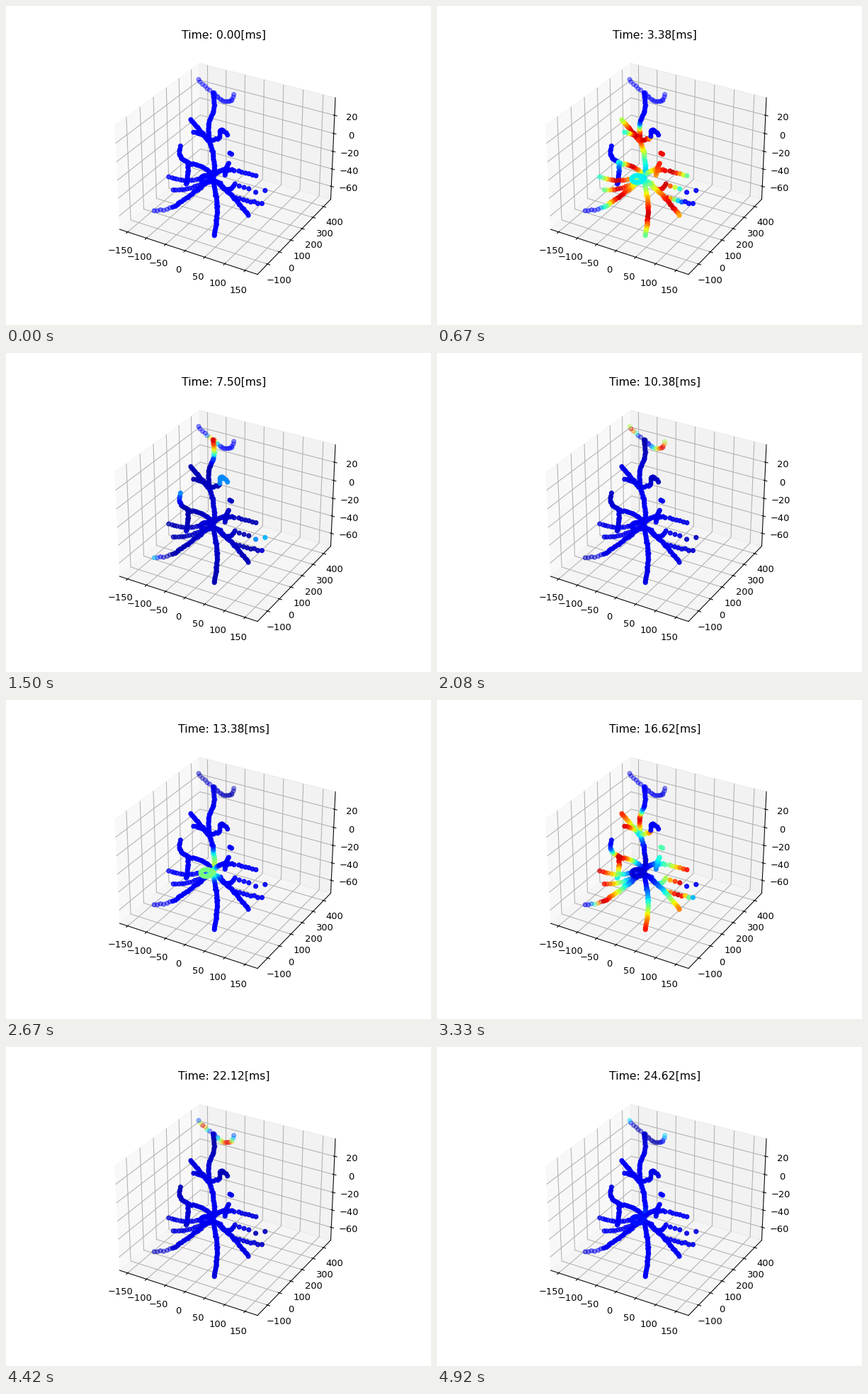
Write a matplotlib script that moves like this. It is 600 by 450 pixels and loops after 5.01 s.

```python
import matplotlib.pyplot as plt
import numpy as np
from matplotlib.animation import FuncAnimation

W, H = 600, 450
TICK_MS, TICKS = 30, 167             # one loop lasts 5010 ms
FPS, STEPS = 12, 60
REST, PEAK = 0.11, 0.93              # membrane levels on the colour map
FIRST_SPIKE, PERIOD = 1.95, 12.3     # simulated ms
SOMA = 291, 243

rng = np.random.default_rng(4)
parts = []


def add(x, y, delay, alpha):
    parts.append(np.broadcast_arrays(x, y, delay, alpha))


def grow(points, start, end, power=1, gap=2.5, alpha=0.9):
    """Dots on a smooth curve through points; the wave passes from start to end."""
    pts = np.array(points, float)
    chord = np.hypot(*np.diff(pts, axis=0).T)
    at = np.concatenate([[0], np.cumsum(chord)]) / chord.sum()
    s = np.linspace(0, 1, max(2, round(chord.sum() / gap) + 1))
    x, y = (np.polyval(np.polyfit(at, c, len(pts) - 1), s)
            + rng.normal(0, 0.4, len(s)) for c in pts.T)
    add(x, y, start + (end - start) * s ** power, alpha)


# Apical tuft and trunk
grow([(288, 119), (277, 110), (272, 103)], 6, 9, gap=5, alpha=0.42)
grow([(293, 122), (302, 131), (314, 135), (322, 125)], 5.6, 9, alpha=0.42)
grow([(293, 150), (294, 140), (292, 122)], 3.8, 5.5, alpha=0.7)
grow([SOMA, (291, 203), (286, 178), (293, 150)], 0, 3.8, power=2.3)

# Oblique dendrites
grow([(285, 189), (261, 160)], 1, 2)
grow([(281, 183), (266, 178)], 1.3, 2.2)
grow([(286, 190), (301, 187)], 1, 1.8)
grow([(302, 183), (304, 175), (313, 182)], 4, 4)

# Left side
grow([SOMA, (268, 224), (250, 217), (246, 198)], 0, 4)
grow([(256, 220), (257, 236), (254, 251)], 2.2, 3.2)
grow([(284, 240), (260, 246), (230, 241)], 0.3, 2.2, gap=4, alpha=0.75)
grow([(284, 247), (260, 257), (236, 260)], 0.3, 2.1, gap=4, alpha=0.75)
grow([SOMA, (262, 266), (236, 284)], 0, 2.2)
grow([(232, 285), (220, 288), (209, 288)], 2.4, 4.1, gap=5, alpha=0.5)

# Right side
grow([SOMA, (305, 232), (322, 232)], 0, 1.2)
grow([(328, 233), (353, 239)], 1.3, 2.1, gap=5)
grow([(309, 238), (314, 222)], 0.8, 1.1)
grow([(316, 208), (319, 209)], 1.2, 1.2)
grow([(303, 250), (311, 259), (323, 251)], 0.5, 1.4)
grow([(329, 254), (343, 258)], 1.7, 2.2, gap=7)
grow([(352, 263), (366, 260)], 4, 4.1, gap=14)
grow([(320, 269), (341, 275), (361, 279)], 1.3, 3.3, gap=5)
grow([SOMA, (319, 268), (342, 295)], 0, 1.8)

# Descending dendrite and the ring beside the soma
grow([SOMA, (298, 282), (294, 324)], 0, 2.1)
angle = np.linspace(0, 2 * np.pi, 18)
add(283 + 8 * np.cos(angle), 244 + 5 * np.sin(angle), 0.1, 1)

X, Y, DELAY, ALPHA = np.hstack(parts)
# Charging is slow at the soma and steeper along the dendrites
SCALE = 1 - 0.4 * np.minimum(1, DELAY / 0.4)


def levels(t):
    v = np.full(len(X), REST)
    for k in range(3):
        tau = t - FIRST_SPIKE - k * PERIOD - DELAY
        rise = PEAK / np.cosh(1.15 * tau / SCALE)
        fall = PEAK * np.exp(-(tau / 1.35) ** 2)
        recovery = REST * (1 - np.exp(-(tau / 5) ** 2))
        v = np.where(tau < 0, np.maximum(v, rise), fall + recovery)
    return REST + (v - REST) * min(1, t / 0.8)


fig = plt.figure(figsize=(6.4, 4.8), dpi=W / 6.4)
ax = fig.add_subplot(projection="3d")
ax.set(xlim=(-171.5, 180), ylim=(-183, 469), zlim=(-75, 39),
       xticks=range(-150, 151, 50), yticks=range(-100, 401, 100),
       zticks=range(-60, 21, 20))
title = ax.set_title("")

# The cell is laid out directly in stage pixels
stage = fig.add_axes([0, 0, 1, 1])
stage.set(xlim=(0, W), ylim=(H, 0))
stage.axis("off")
cell = stage.scatter(X, Y, s=20)


def update(tick):
    # The picture advances at 12 steps per second, held between steps
    step = min(STEPS - 1, (tick * TICK_MS + 20) * FPS // 1000)
    t = round(step * 10 / 3) * 0.125
    title.set_text(f"Time: {t:.2f}[ms]")
    colors = plt.cm.jet(levels(t))
    colors[:, 3] = ALPHA
    cell.set_facecolor(colors)
    cell.set_edgecolor(colors)
    return cell, title


anim = FuncAnimation(fig, update, frames=TICKS, interval=TICK_MS,
                     repeat=True, repeat_delay=0)
plt.show()
```
